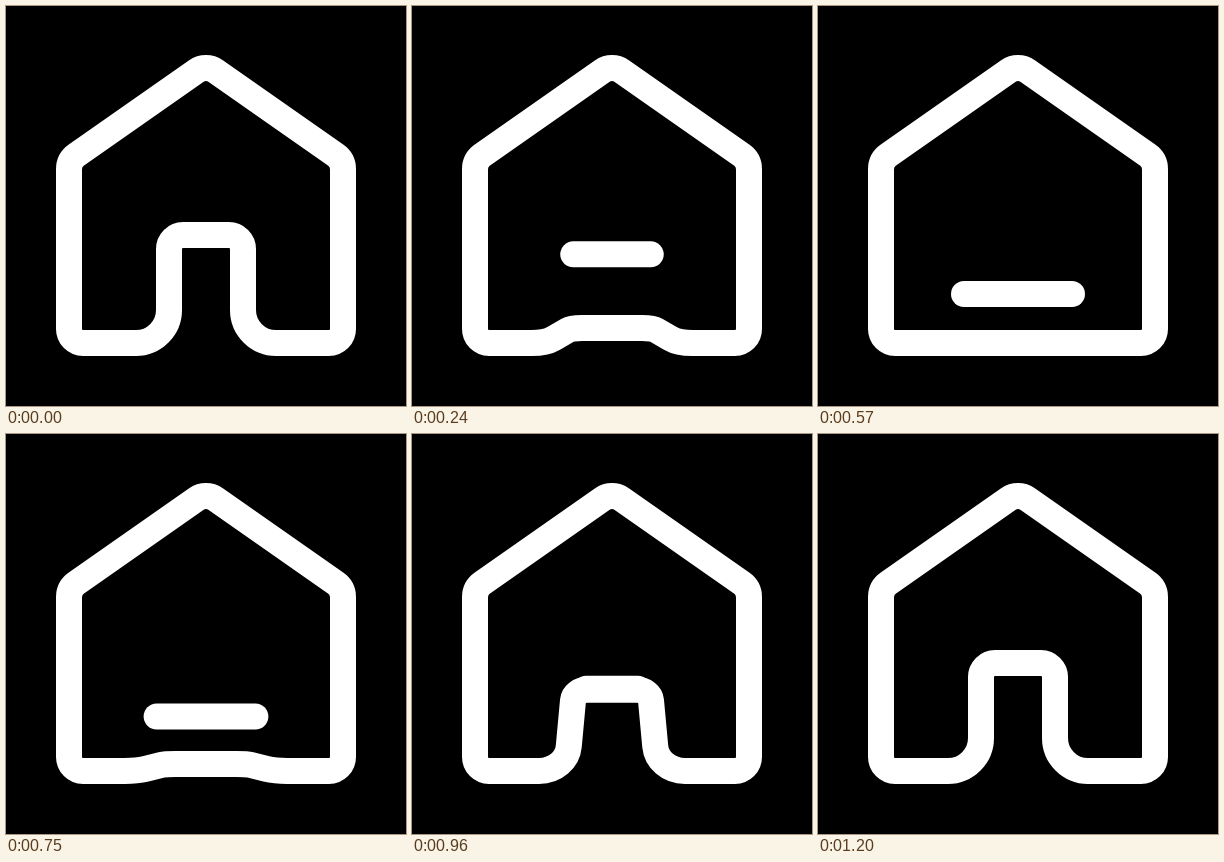
Animation, 400 px wide and 400 px high, one loop 3230 ms. Source, as an HTML page with a canvas:

```html
<!DOCTYPE html>
<html lang="en">
<head>
<meta charset="utf-8">
<title>Home icon</title>
<style>
  html, body { margin: 0; width: 100%; height: 100%; overflow: hidden; background: #000; }
  canvas { display: block; }
</style>
</head>
<body>
<canvas id="stage" width="400" height="400"></canvas>
<script>
const ctx = document.getElementById('stage').getContext('2d');
const LOOP = 3230, STEP = 30, CLOSED = 600;
const FLOOR = 337, DOOR_TOP = 229, BAR_REST = 288;

const clamp = v => Math.min(1, Math.max(0, v));
const mix = (a, b, k) => a + (b - a) * k;

// Cubic easing through (x1, 0) and (x2, 1), solved by bisection
function ease(x1, x2, u) {
  u = clamp(u);
  let lo = 0, hi = 1;
  for (let i = 0; i < 30; i++) {
    const s = (lo + hi) / 2, r = 1 - s;
    if (3 * r * r * s * x1 + 3 * r * s * s * x2 + s * s * s < u) lo = s; else hi = s;
  }
  return lo * lo * (3 - 2 * lo);
}
const swift = u => ease(.4, .2, u);
const steep = u => ease(.68, .32, u);

// shut: 0 = open doorway, 1 = flat floor
function pose(t) {
  if (t < CLOSED) {
    return {
      shut: swift(t / 412),
      barY: mix(DOOR_TOP, BAR_REST, steep((t - 33) / 470)),
      barHalf: mix(4, 54, swift(t / 540))
    };
  }
  const shut = 1 - steep((t - CLOSED) / 605);
  const lift = clamp((t - 660) / 440) ** 1.5;
  const door = mix(DOOR_TOP, FLOOR, shut);
  return {
    shut,
    barY: Math.min(door, mix(BAR_REST, DOOR_TOP, lift)),
    barHalf: mix(54, 4, lift)
  };
}

function halfHouse(shut) {
  const y = open => mix(open, FLOOR, shut);
  const x = (open, flat) => mix(open, flat, shut);
  ctx.beginPath();
  ctx.moveTo(200, 62.1);
  ctx.arc(200, 79.1, 17, -Math.PI / 2, -Math.PI / 2 - Math.atan(.7), true);
  ctx.arcTo(63, 154.3, 63, 250, 17);
  ctx.arcTo(63, FLOOR, 100, FLOOR, 14);
  ctx.lineTo(x(130, 118), FLOOR);
  ctx.bezierCurveTo(x(148.2, 129), FLOOR, x(163, 133), y(322.2), x(163, 138), y(304));
  ctx.lineTo(x(163, 155), y(243));
  ctx.bezierCurveTo(x(163, 157), y(235.3), x(169.3, 161), y(DOOR_TOP), x(177, 169), y(DOOR_TOP));
  ctx.lineTo(200, y(DOOR_TOP));
  ctx.stroke();
}

function draw(t) {
  const { shut, barY, barHalf } = pose(t);
  ctx.setTransform(1, 0, 0, 1, 0, 0);
  ctx.fillStyle = '#000';
  ctx.fillRect(0, 0, 400, 400);
  ctx.strokeStyle = '#fff';
  ctx.lineWidth = 26;
  ctx.lineJoin = 'round';

  ctx.lineCap = 'butt';
  halfHouse(shut);
  ctx.setTransform(-1, 0, 0, 1, 400, 0);
  halfHouse(shut);

  if (t >= STEP && t < 1200) {
    ctx.lineCap = 'round';
    ctx.beginPath();
    ctx.moveTo(200 - barHalf, barY);
    ctx.lineTo(200 + barHalf, barY);
    ctx.stroke();
  }
}

const start = performance.now();
function frame() {
  const t = (performance.now() - start) % LOOP;
  draw(Math.floor(t / STEP) * STEP);
  requestAnimationFrame(frame);
}
frame();
</script>
</body>
</html>
```
